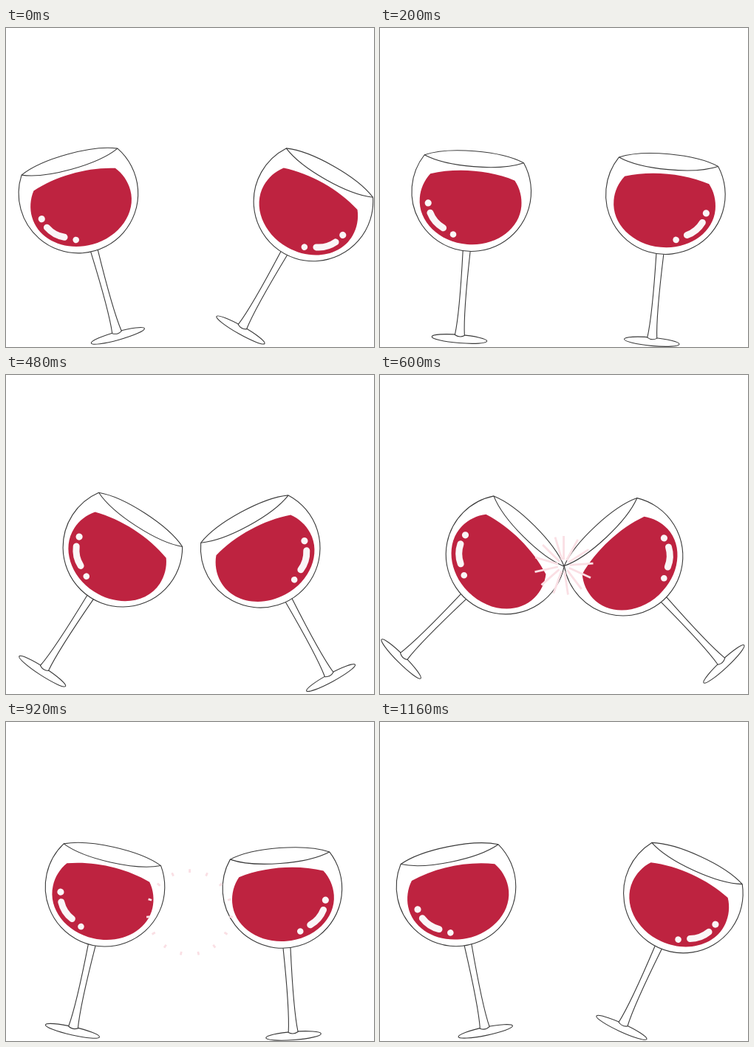
These frames come from a looping animation (498x432 px, 1.2 s). An HTML page with a canvas:

```html
<!DOCTYPE html>
<html lang="en">
<head>
<meta charset="utf-8">
<title>Cheers</title>
<style>
  html, body { margin: 0; width: 100%; height: 100%; overflow: hidden; background: #fff; }
  canvas { display: block; width: 498px; height: 432px; }
</style>
</head>
<body>
<canvas id="stage"></canvas>
<script>
const W = 498, H = 432, LOOP = 1200, STEP = 40, HIT = 600;
const INK = '#3a3a3a', WINE = '#be2340', SHINE = '#faf6f7', SPARK = '#fadfe4';
const RAD = Math.PI / 180;

// Each glass swings about a point on its own axis.
const glasses = [
  { x: 117.7, y: 295.4, from: -15.5, to: 45, side: 1 },
  { x: 379.5, y: 299.3, from: 29.5, to: -43, side: -1 }
];

const canvas = document.getElementById('stage');
const ctx = canvas.getContext('2d');
const dpr = window.devicePixelRatio || 1;
canvas.width = W * dpr;
canvas.height = H * dpr;

function outline(path) {
  ctx.fillStyle = '#fff';
  ctx.fill(path);
  ctx.stroke(path);
}

// Paths are relative to the bowl centre.
const foot = new Path2D();
foot.ellipse(0, 200, 37.4, 5.6, 0, 0, Math.PI * 2);

const stem = new Path2D('M-5 80C-4 115-2.5 165-6.5 195Q0 199 6.5 195C2.5 165 4 115 5 80');

const bowl = new Path2D();
const rimAngle = Math.atan2(-44.6, 67.4);
bowl.arc(0, 0, 80.8, rimAngle, Math.PI - rimAngle);
bowl.bezierCurveTo(-35, -58.6, 35, -58.6, 67.4, -44.6);

const rim = new Path2D('M-67.4-44.6C-35-30.6 35-30.6 67.4-44.6');

const wine = new Path2D('M-57.3-19.7C-22-31 22-31 57.3-19.7C65-10 69 2 69 14' +
  'C69 46 38 71.5 0 71.5C-38 71.5-69 46-69 14C-69 2-65-10-57.3-19.7Z');

const gleam = new Path2D('M-53.3 33Q-47 46-34 52');

function dot(x, y, r) {
  ctx.beginPath();
  ctx.arc(x, y, r, 0, Math.PI * 2);
  ctx.fill();
}

function drawGlass(g, swing) {
  ctx.save();
  ctx.translate(g.x, g.y);
  ctx.rotate((g.from + (g.to - g.from) * swing) * RAD);
  ctx.translate(0, -74);

  ctx.lineWidth = 1.1;
  ctx.lineJoin = 'round';
  ctx.strokeStyle = INK;
  [foot, stem, bowl].forEach(outline);
  ctx.stroke(rim);

  ctx.fillStyle = WINE;
  ctx.fill(wine);

  ctx.scale(g.side, 1);
  ctx.fillStyle = ctx.strokeStyle = SHINE;
  dot(-57.1, 20, 4.6);
  dot(-19.9, 59.7, 4.3);
  ctx.lineWidth = 9;
  ctx.lineCap = 'round';
  ctx.stroke(gleam);
  ctx.restore();
}

function drawSparks(age) {
  if (age < 0 || age >= 400) return;
  const ease = tau => 1 - Math.exp(-age / tau);
  const outer = 40 + 19 * ease(65);
  const inner = 8 + 48 * ease(99);
  const first = age < STEP;
  const count = first ? 13 : 15;
  const gap = first ? 28.6 : 24;

  ctx.save();
  ctx.translate(248.6, 258);
  ctx.strokeStyle = SPARK;
  ctx.lineWidth = 2.8;
  ctx.beginPath();
  for (let i = 0; i < count; i++) {
    const a = i * gap * RAD, s = Math.sin(a), c = -Math.cos(a);
    ctx.moveTo(s * inner, c * inner);
    ctx.lineTo(s * outer, c * outer);
  }
  ctx.stroke();
  ctx.restore();
}

function frame(now) {
  const t = Math.floor((now + 8) / STEP) * STEP % LOOP;
  const swing = 1 - Math.abs(t - HIT) / HIT;
  ctx.setTransform(dpr, 0, 0, dpr, 0, 0);
  ctx.fillStyle = '#fff';
  ctx.fillRect(0, 0, W, H);
  glasses.forEach(g => drawGlass(g, swing));
  drawSparks(t - HIT);
  requestAnimationFrame(frame);
}

frame(performance.now());
</script>
</body>
</html>
```
